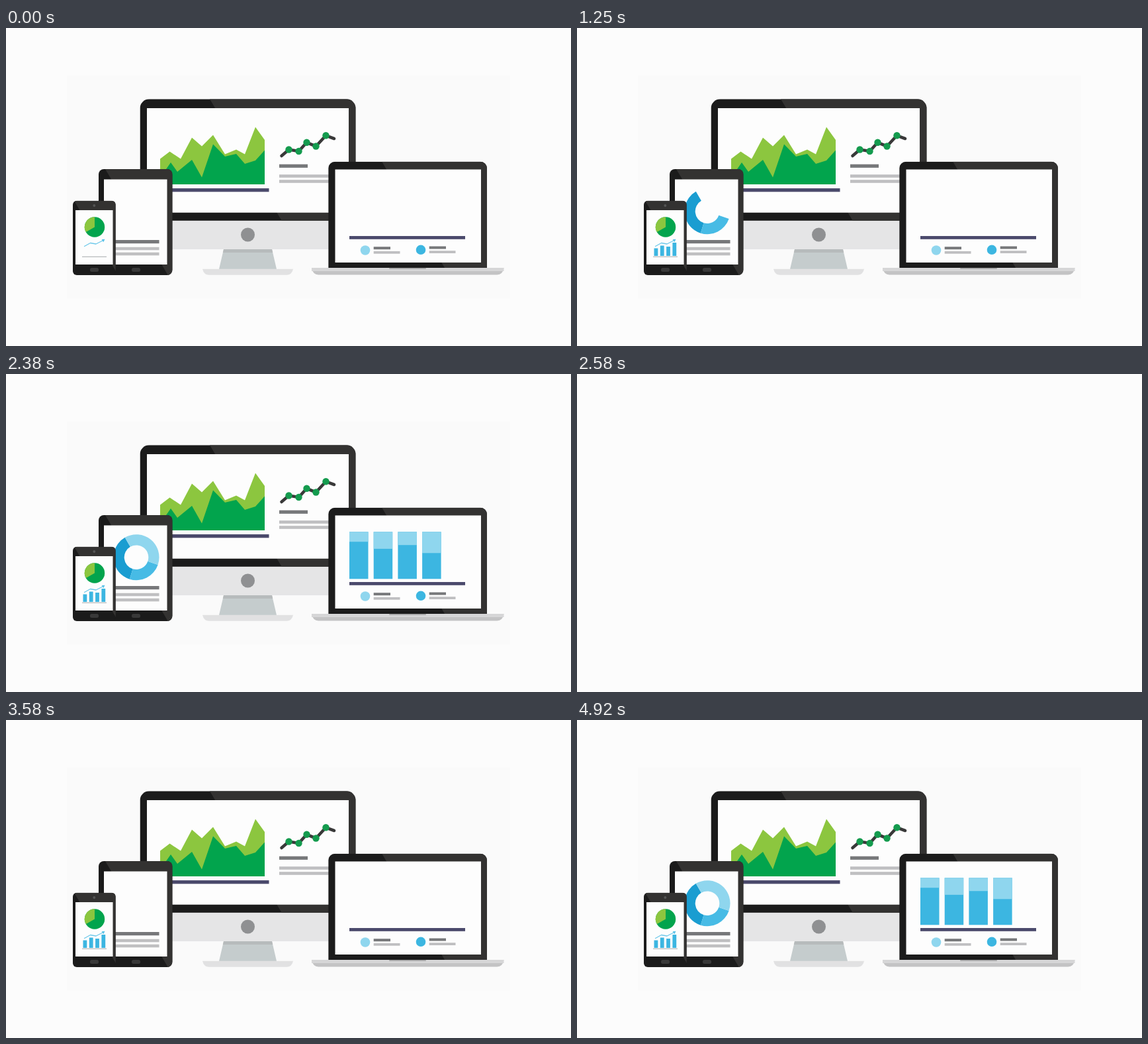
These frames come from a looping animation (854 px wide and 480 px high, 4.96 s). An HTML page:

```html
<!DOCTYPE html>
<html lang="en">
<head>
<meta charset="utf-8">
<title>Devices with charts</title>
<style>
  html, body { margin: 0; width: 100%; height: 100%; overflow: hidden; background: #fcfcfc; }
  svg { display: block; width: 854px; height: 480px; }
</style>
</head>
<body>
<svg id="stage" viewBox="0 0 854 480"></svg>
<script>
const LOOP = 4960, CYCLE = 2708;          // the loop cuts the second cycle short
const FIRST = 122, STEP = 208.33;         // parts pop in at an even pace
const HIDE = 2535, SHOW = 2660;           // short blank between cycles
const SLANT = 0.592;                      // lean of the glare on every case

const C = {
  dark: '#1b1b1b', lite: '#333231', button: '#393939', screen: '#fdfdfd', navy: '#4b4a6c',
  text: '#77787a', rule: '#bfbfc1', leaf: '#8cc63f', green: '#02a44d',
  pale: '#8fd6ee', blue: '#3cb6e1', mid: '#47bbe5', deep: '#1a9dd1'
};

const box = (x, y, w, h, fill, r = 0) =>
  `<rect x="${x}" y="${y}" width="${w}" height="${h}" rx="${r}" fill="${fill}"/>`;
const disc = (x, y, r, fill) => `<circle cx="${x}" cy="${y}" r="${r}" fill="${fill}"/>`;
const poly = (points, fill) => `<polygon points="${points}" fill="${fill}"/>`;
const line = (points, stroke, width) =>
  `<polyline points="${points}" fill="none" stroke="${stroke}" stroke-width="${width}" stroke-linecap="round" stroke-linejoin="round"/>`;
const part = content => `<g class="part">${content}</g>`;
const repeat = (n, make) => Array.from({ length: n }, (_, i) => make(i)).join('');

// Symmetric shape with a flat top and bottom, centred on cx.
const trapezoid = (cx, y, top, h, bottom, fill) =>
  poly([[cx - top / 2, y], [cx + top / 2, y], [cx + bottom / 2, y + h], [cx - bottom / 2, y + h]], fill);

// Bar with rounded lower corners.
const foot = (x, y, w, h, fill) =>
  `<path d="M${x} ${y}h${w}q-2 ${h} -10 ${h}h${20 - w}q-8 0 -10 ${-h}z" fill="${fill}"/>`;

// Ring slice, angles in degrees clockwise from the top.
function slice(cx, cy, outer, inner, from, to, fill) {
  const at = (r, deg) => {
    const a = deg * Math.PI / 180;
    return `${cx + r * Math.sin(a)} ${cy - r * Math.cos(a)}`;
  };
  const big = to - from > 180 ? 1 : 0;
  return `<path fill="${fill}" d="M${at(outer, from)}A${outer} ${outer} 0 ${big} 1 ${at(outer, to)}` +
    `L${at(inner, to)}A${inner} ${inner} 0 ${big} 0 ${at(inner, from)}Z"/>`;
}

// Dark case, lighter to the right of a slanted edge; the case may be cut off flat below.
function bezel(id, x, y, w, h, r, glare, full = h) {
  const left = x + glare, right = x + w;
  return `<clipPath id="${id}Case">${box(x, y, w, full, '#000', r)}</clipPath>
    <g clip-path="url(#${id}Case)">${box(x, y, w, h, C.dark)}
    ${poly([[left, y], [right + h, y], [right + h, y + h], [left + h * SLANT, y + h]], C.lite)}</g>`;
}

// One heading bar and two lighter lines of copy below it.
const copy = (x, y, headWidth, lineWidth, gap) => box(x, y, headWidth, 5.2, C.text) +
  repeat(2, i => box(x, y + gap + i * 8, lineWidth, 4.6, C.rule));

const homeButton = cx => box(cx - 6.5, 362, 13, 6, C.button, 2.5);

function monitor() {
  const area = (points, fill) => poly(`233,236 ${points} 391,236`, fill);
  const trend = [[416.5, 193], [427.5, 183.5], [442.5, 186], [454.5, 172.8], [468.5, 178.5], [483.5, 162.3], [496, 167]];
  return box(203, 270, 325, 64, '#e5e5e6', 8) +
    bezel('monitor', 202.5, 107.3, 326, 183.5, 14, 105.5, 220) +
    box(213, 121, 305, 157.7, C.screen) +
    disc(365.5, 312, 10.5, '#8f9092') +
    trapezoid(365.5, 334, 73, 30, 87, '#c5cccd') +
    trapezoid(365.5, 334, 73, 5, 75.4, '#b7bbbc') +
    foot(297, 363.7, 137, 9, '#e1e1e2') +
    area('233,197.5 247.5,186.5 264,197.5 281,165.5 296,178.5 313,161.5 331,190.5 348,183.5 361,190.5 377,149.5 391,169', C.leaf) +
    area('233,226 249,203 259,217 281,199 296,225.5 313,175.5 331,194 348,190 361,205 377,200 391,184.5', C.green) +
    box(233, 242, 164.5, 5.3, C.navy) +
    line(trend, C.button, 4.6) +
    trend.slice(1, -1).map(([x, y]) => disc(x, y, 5.2, '#149b4e')).join('') +
    copy(413, 205.7, 43, 80, 15.5);
}

function laptop() {
  const shares = [0.21, 0.36, 0.28, 0.45, 0.17];   // pale part of each bar
  const bars = repeat(shares.length, i => {
    const x = 519 + i * 36.7, h = 71;
    return part(box(x, 238.3, 28.5, h, C.blue) + box(x, 238.3, 28.5, h * shares[i], C.pale));
  });
  const legend = (x, y, fill) => disc(x, y, 7.3, fill) +
    box(x + 12.7, y - 5.3, 25.3, 4, C.text) + box(x + 12.7, y + 1.4, 39.8, 3.8, C.rule);
  return bezel('laptop', 487.2, 201.7, 239.8, 160.3, 10, 81, 190) +
    box(497.5, 213.5, 220.5, 140.5, C.screen) +
    foot(462, 362, 290.5, 10.5, '#c3c3c4') +
    box(462, 362, 290.5, 5, '#d6d6d7') +
    box(579, 362, 56, 2, '#a9a9aa', 1) +
    box(519, 314, 175, 4.8, C.navy) +
    legend(543, 335.5, C.pale) + legend(627, 334.8, C.blue) + bars;
}

function tablet() {
  const ring = (from, to, fill) => part(slice(197, 276.7, 34.5, 18.3, from, to, fill));
  return bezel('tablet', 140, 213, 111.5, 160, 8, 10) +
    box(148, 228.5, 95.5, 128.5, C.screen) +
    homeButton(196.5) +
    copy(155, 320, 76.5, 76.5, 10.7) +
    ring(197, 330, C.deep) + ring(109, 197, C.mid) + ring(330, 469, C.pale);
}

function phone() {
  const heights = [11.5, 15.5, 14, 20];
  const bars = repeat(heights.length, i =>
    part(box(116.5 + i * 9.3, 344 - heights[i], 5.8, heights[i], C.blue)));
  return bezel('phone', 101, 260.7, 64.7, 112.3, 6, 2) +
    box(105, 275, 56.5, 82, C.screen) +
    disc(133.3, 268, 2, '#555') +
    homeButton(133.5) +
    disc(134, 300.5, 15.2, C.green) +
    slice(134, 300.5, 15.2, 0, 240, 360, C.leaf) +
    line('118.5,329.5 127.5,324.5 136,326 147,320.5', '#6cc8ea', 1.3) +
    poly('144.5,319 149.5,318.8 147.3,323.3', '#5cc2e8') +
    box(115, 344.7, 37, 1.3, '#b9bcbe') + bars;
}

const stage = document.getElementById('stage');
// Painted back to front; parts appear from the front device to the back one.
stage.innerHTML = `<g id="scene">${box(92, 72, 670, 336, '#fafafa')}${monitor()}
  <g id="laptop">${laptop()}</g><g id="tablet">${tablet()}</g><g id="phone">${phone()}</g></g>`;

const scene = document.getElementById('scene');
const parts = ['phone', 'tablet', 'laptop']
  .flatMap(id => [...document.querySelectorAll(`#${id} .part`)]);

const show = (el, visible) => { el.style.display = visible ? '' : 'none'; };

function draw(now) {
  const t = (now % LOOP) % CYCLE;
  show(scene, t < HIDE || t >= SHOW);
  parts.forEach((el, i) => show(el, t >= FIRST + i * STEP && t < HIDE));
}

const begin = performance.now();
function tick() {
  draw(performance.now() - begin);
  requestAnimationFrame(tick);
}
tick();
</script>
</body>
</html>
```
